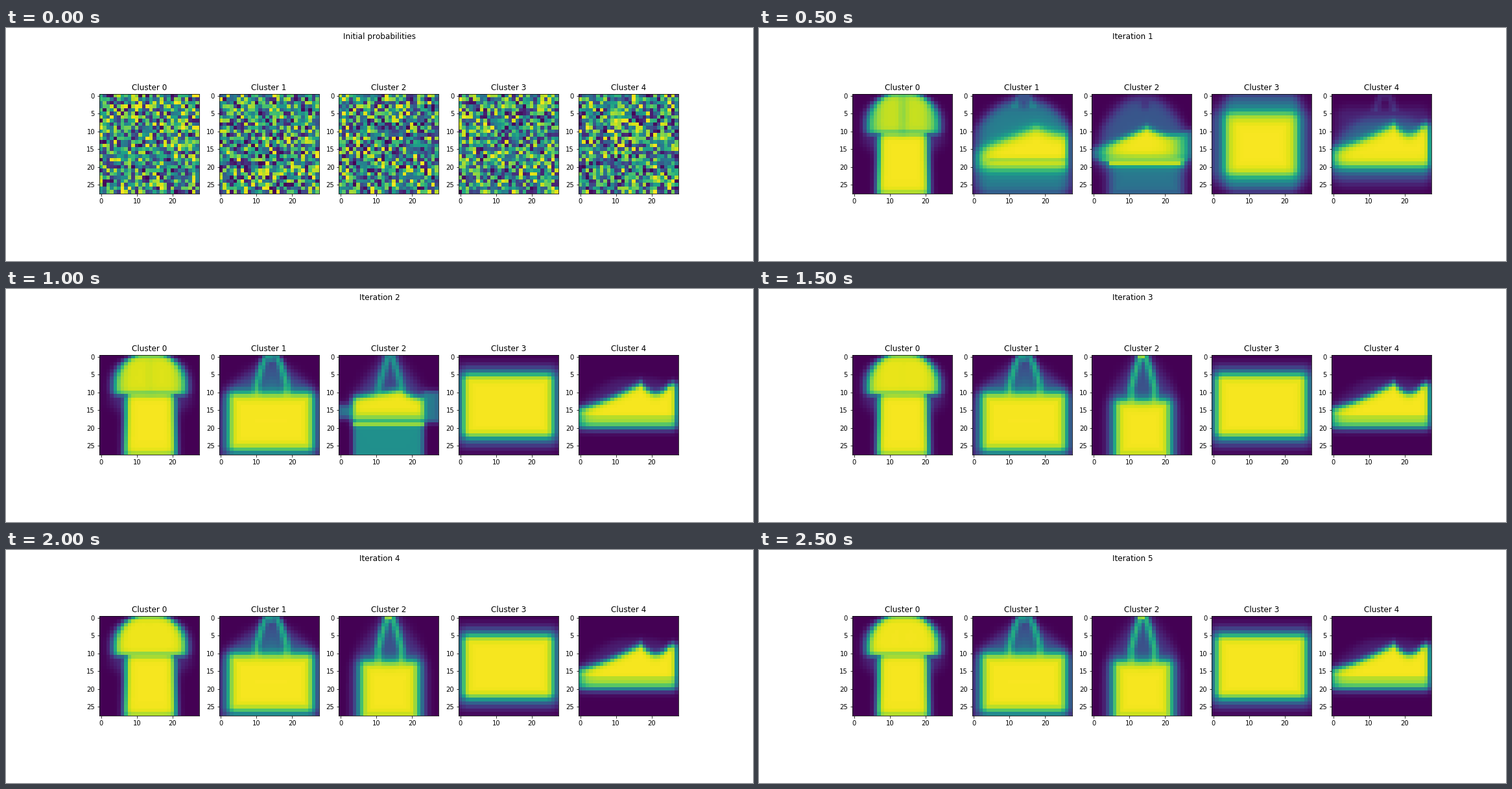
These frames come from a looping animation (1152 px wide and 360 px high, 3000 ms). A matplotlib script:

```python
import numpy as np
import matplotlib.pyplot as plt
from matplotlib.animation import FuncAnimation

plt.rcParams["font.family"] = "DejaVu Sans"
plt.rcParams["text.kerning_factor"] = 6

SIZE = 28
CLUSTERS = 5
STEPS = 6
X, Y = np.meshgrid(np.arange(SIZE, dtype=float), np.arange(SIZE, dtype=float))


def rise(d, soft=0.7):
    """Soft step: 0 below zero, 1 above."""
    return 1 / (1 + np.exp(-d / soft))


def box(left, right, top, bottom, radius=2.0, soft=0.7):
    """Rounded rectangle with blurred edges."""
    qx = np.abs(X - (left + right) / 2) - (right - left) / 2 + radius
    qy = np.abs(Y - (top + bottom) / 2) - (bottom - top) / 2 + radius
    outside = np.hypot(np.maximum(qx, 0), np.maximum(qy, 0))
    dist = outside + np.minimum(np.maximum(qx, qy), 0) - radius
    return rise(-dist, soft)


def spot(cx, cy, rx, ry):
    return np.exp(-((X - cx) / rx) ** 2 - ((Y - cy) / ry) ** 2)


def mix(*layers):
    """Screen blend of several probability fields."""
    return 1 - np.prod([1 - layer for layer in layers], axis=0)


def tent(top, slope, cx=14.0):
    return rise(top + slope * Y - np.abs(X - cx), 1.2)


def arch(cx, width, height, power=0.5):
    """Bag handle: two legs that meet at the top edge."""
    half = width * np.minimum(1, (Y + 1) / height) ** power
    legs = np.exp(-((np.abs(X - cx) - half) / 1.1) ** 2)
    return np.maximum(legs, spot(cx, 0.3, 1.8, 1))


def shoe(toe=14.3, peak=17, top=7.5, curve=1.35, dip=2.7, span=8.5,
         left=-1.0, right=27.0, bottom=19.9, soft=0.5):
    """Ramp from the toe up to the tongue, then a dipped collar."""
    ramp = toe - (toe - top) * np.minimum(X / peak, 1) ** curve
    collar = dip * np.sin(np.pi * np.clip((X - peak) / span, 0, 1))
    return (rise(Y - ramp - collar, soft) * rise(bottom - Y, soft + 0.1)
            * rise(X - left, 1.1) * rise(right - X, 0.4))


def shirt(step):
    age = 0.5 ** (step - 1)
    dx = np.abs(X - 13.8)
    curve = np.clip((8 - Y) / 9.3, 0, 1)
    sleeves = rise(10.2 * np.sqrt(1 - curve ** 2) - dx, 0.7)
    sleeves = sleeves * rise(10.7 - Y, 0.4) * rise(Y + 0.9, 0.5)
    body = rise(6.5 + 0.03 * Y - dx, 0.5) * rise(Y - 10, 0.5)
    body = body * rise(28.3 - Y, 0.6)

    upper = rise(11.3 - Y, 0.5)
    sides = rise(dx - 7, 0.7)
    crease = spot(13.8, 5, 1.3, 9)
    tone = 0.985 - upper * age * (0.07 + 0.12 * sides + 0.08 * age * crease)
    halo = 0.12 * box(2.5, 25, 2, 15, 4, 0.9)
    return mix(tone * np.maximum(sleeves, body), halo * (1 - upper))


def wide_bag(step):
    if step == 1:
        back = 0.43 * tent(4, 1.1) * box(0.7, 26.8, 1.5, 28, 4, 1.1)
        hole = 0.17 * spot(14, 2.7, 1.3, 1.4)
        front = shoe(toe=15.5, peak=17.5, top=8.7, curve=1, dip=2, span=16,
                     left=1.3, right=26.2, bottom=20.8, soft=0.8)
        seam = 0.2 * box(4, 26, 17.5, 18.5, 0, 0.2)
        return mix(back - hole * back, 0.2 * arch(14, 2.5, 4) * (Y < 4),
                   0.98 * front * (1 - seam))
    body = 0.985 * box(2, 26, 10, 26.5, 2, 0.75)
    handle = 0.54 * arch(14.2, 4.2, 9) * rise(11 - Y, 0.8)
    hole = 0.14 * box(12, 16.5, 1, 10, 2, 0.7)
    halo = 0.22 * tent(2.2, 1.05) * box(0.2, 27, -1, 40, 0, 1)
    return mix(body, handle, hole, halo * np.minimum(1, (Y + 2) / 9))


def tall_bag(step):
    if step == 1:
        tone = 0.98 - 0.6 * rise(np.abs(X - 13.8) - 10.5, 1.6)
        front = tone * shoe(toe=14.6, peak=15, top=8.9, curve=1.3, dip=2.2,
                            span=14, left=-0.8, right=27.5, bottom=17.9)
        seam = 0.38 * box(2, 26, 17.5, 18.5, 0, 0.2)
        sole = 0.9 * box(4.5, 25, 18.5, 19.7, 0, 0.25)
        skirt = 0.39 * box(4.5, 25, 17, 28.4, 1, 0.9)
        back = 0.27 * tent(4, 0.9) * box(2, 26, 0.5, 20, 2, 1)
        hole = 0.4 * spot(14.5, 2.5, 1.2, 1.5)
        return mix(front, seam, sole, skirt, back * (1 - hole))
    if step == 2:
        band = 0.98 * shoe(toe=12, peak=16.5, top=9.3, curve=1, dip=2.2,
                           span=14, bottom=17.6)
        band = band * box(3.4, 23.6, 0, 30, 0, 0.4)
        sole = 0.7 * box(3.5, 23.5, 18.5, 19.5, 0, 0.2)
        skirt = 0.5 * box(3.7, 23.3, 16.5, 30, 0, 0.4)
        toe = 0.4 * box(-0.8, 4, 13.6, 17.2, 0, 0.5)
        heel = 0.4 * box(23.2, 27.8, 9.8, 18.4, 1, 0.4)
        handle = 0.43 * arch(14, 3.3, 10, 0.8) * rise(10.5 - Y, 0.8)
        halo = 0.2 * tent(1.5, 0.75) * rise(11.5 - Y, 0.8)
        return mix(band, sole, skirt, toe, heel, handle, halo)
    grow = 0.4 * min(step - 3, 1)
    body = 0.985 * box(5.9 - grow, 21.8 + grow, 12, 28.8, 2, 0.75)
    handle = 0.57 * arch(13.9, 3.3, 10, 0.7) * rise(13 - Y, 0.8)
    knot = 0.75 * spot(13.6, 0, 1.1, 0.7)
    hole = 0.1 * box(11.5, 16.5, 2, 11.5, 1, 0.6)
    halo = 0.16 * tent(1.6 + grow, 0.75)
    halo = halo * box(3.8 - grow, 23.6 + grow, -1, 40, 0, 0.7)
    return mix(body, handle, knot, hole, halo)


def flat_bag(step):
    if step == 1:
        core = 0.92 * box(5.2, 21.8, 7, 21, 2, 0.9)
        edge = 0.78 * box(3.2, 23.6, 4.9, 22.4, 2, 0.65)
        column = 0.32 * box(3.5, 24, -0.5, 26.8, 3, 0.8)
        sides = 0.28 * box(-0.7, 26.9, 3, 25, 5, 1)
        return mix(core, edge, column, sides)
    inner = 0.98 * box(0.8, 26.1, 5, 22.6, 2, 0.6)
    outer = 0.33 * box(-0.8, 27.9, 3, 24.9, 3, 0.9)
    return mix(inner, outer)


def sneaker(step):
    if step == 1:
        front = 0.98 * shoe(toe=14.7, top=8, left=-0.2, bottom=20.2, soft=0.65)
        back = 0.24 * tent(1, 1.05, 15) * box(-0.5, 27, 6.5, 23.2, 2, 1)
        faint = 0.1 * box(1, 27, 3.5, 25.5, 3, 0.9)
        handle = 0.1 * arch(14.5, 2.6, 5) * (Y < 5)
        return mix(front, back, faint, handle)
    sole = 0.1 * rise(Y - 16.5, 0.15)
    back = 0.08 * tent(-1, 1.3, 16) * box(0.5, 26.5, 6, 20.5, 1, 0.6)
    return mix((0.985 - sole) * shoe(), back)


PARTS = (shirt, wide_bag, tall_bag, flat_bag, sneaker)
noise = np.random.default_rng(0).random((CLUSTERS, SIZE, SIZE))
fields = [noise] + [[part(k) for part in PARTS] for k in range(1, STEPS)]

fig, axes = plt.subplots(1, CLUSTERS, figsize=(16, 5), dpi=72)
fig.subplots_adjust(left=0.125, right=0.9, bottom=0.125, top=0.88, wspace=0.2)
heading = fig.suptitle("Initial probabilities", fontsize=12, y=0.98)

images = []
for i, ax in enumerate(axes):
    images.append(ax.imshow(fields[0][i], cmap="viridis", vmin=0, vmax=1,
                            interpolation="nearest"))
    ax.set_title(f"Cluster {i}", fontsize=12)
    ax.set_xticks(range(0, SIZE, 10))
    ax.set_yticks(range(0, SIZE, 5))


def draw(step):
    heading.set_text(f"Iteration {step}" if step else "Initial probabilities")
    for image, field in zip(images, fields[step]):
        image.set_data(field)
    return [heading, *images]


anim = FuncAnimation(fig, draw, frames=STEPS, interval=500,
                     repeat=True, repeat_delay=0, blit=False)
plt.show()
```
